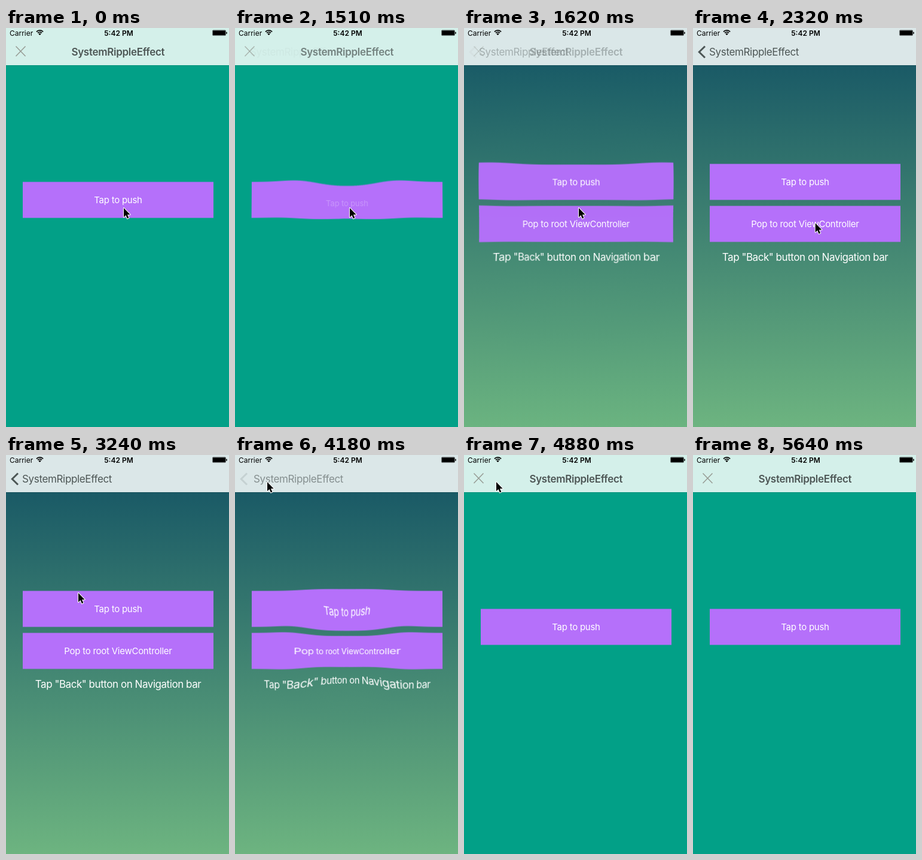
These frames come from a looping animation (373 by 665 pixels, 6.42 s). An HTML page with a canvas:

```html
<!DOCTYPE html>
<html lang="en">
<head>
<meta charset="utf-8">
<title>Ripple transition</title>
<style>
  html, body { margin: 0; width: 100%; height: 100%; overflow: hidden; background: #02a087; }
  canvas { display: block; width: 373px; height: 665px; }
</style>
</head>
<body>
<canvas id="stage" width="373" height="665"></canvas>
<script>
const W = 373, H = 665, BAR = 62, LOOP = 6420;
const PUSH = 1440, POP = 4120;
const PUSH_STEPS = [0, 70, 120, 180, 270, 330, 420, 480, 540, 610, 700, 760, 820, 880, 940, 1000];
const POP_STEPS = [0, 60, 150, 210, 300, 360, 450, 510, 610, 700, 760];

// Pointer moves: start, end, refreshes, from x, y, to x, y
const MOVES = [
  [0, 540, 1, 196, 299, 196, 299],
  [540, 650, 3, 196, 299, 191, 299],
  [2140, 2440, 6, 191, 299, 210, 337],
  [2610, 3240, 11, 210, 339, 120, 229],
  [3300, 3360, 2, 120, 229, 106, 175],
  [3540, 3710, 4, 106, 175, 53, 44],
  [5120, 5410, 6, 53, 44, 345, 640],
  [5590, 5640, 2, 345, 640, 345, 670]
];

const ctx = document.getElementById('stage').getContext('2d', { willReadFrequently: true });

const clamp = v => Math.max(0, Math.min(1, v));
const smooth = (a, b, v) => { const u = clamp((v - a) / (b - a)); return u * u * (3 - 2 * u); };
const fall = (length, power, t) => Math.pow(clamp(1 - t / length), power);
const snap = (steps, t) => steps.reduce((last, s) => s <= t ? s : last, 0);
const bell = v => Math.exp(-v * v);

function withAlpha(alpha, draw) {
  ctx.save();
  ctx.globalAlpha *= alpha;
  draw();
  ctx.restore();
}

function text(str, x, y, size, spacing, color, align = 'center', weight = 400) {
  ctx.font = `${weight} ${size}px Inter, Roboto, sans-serif`;
  ctx.letterSpacing = spacing + 'px';
  ctx.textAlign = align;
  ctx.fillStyle = color;
  ctx.fillText(str, x, y);
}

function line(points, width, color) {
  ctx.beginPath();
  points.forEach(([x, y], i) => i ? ctx.lineTo(x, y) : ctx.moveTo(x, y));
  ctx.lineWidth = width;
  ctx.strokeStyle = color;
  ctx.stroke();
}

function button(label, y, textAlpha = 1) {
  ctx.fillStyle = '#b570fa';
  ctx.fillRect(28, y, 319, 60);
  withAlpha(textAlpha, () => text(label, 187.5, y + 35.5, 15, -0.25, '#fff'));
}

function rootScreen(textAlpha) {
  ctx.fillStyle = '#02a087';
  ctx.fillRect(0, 0, W, H);
  button('Tap to push', 256.5, textAlpha);
}

function detailScreen() {
  const fill = ctx.createLinearGradient(0, BAR, 0, H);
  fill.addColorStop(0, 'rgb(26,90,102)');
  fill.addColorStop(1, 'rgb(109,180,128)');
  ctx.fillStyle = fill;
  ctx.fillRect(0, 0, W, H);
  button('Tap to push', 226.5);
  button('Pop to root ViewController', 296.5);
  text('Tap "Back" button on Navigation bar', 187.5, 388, 17, -0.45, '#fff');
}

// Radial wave: an outward crest followed by an inward trough.
function ripple(t) {
  const crest = 75 + 0.6 * t, width = 18 + 0.15 * t;
  const push = 4.2 * clamp((t + 15) / 85) * clamp((610 - t) / 300);
  const pull = 7.5 * clamp((t + 15) / 75) * Math.exp(-Math.max(0, t - 70) / 80);
  const shift = [];
  for (let r = 0; r < 420; r++) {
    const d = push * bell((r - crest) / width) - pull * bell((r - crest + 57) / 36);
    shift.push(d * Math.min(1, r / 20));
  }
  const image = ctx.getImageData(0, 0, W, H);
  const out = image.data, src = out.slice();
  const cx = W / 2, cy = H / 2;
  for (let y = BAR; y < H; y++) {
    for (let x = 0; x < W; x++) {
      const dx = x - cx, dy = y - cy;
      const r = Math.hypot(dx, dy) || 1;
      const d = shift[Math.round(r)];
      if (Math.abs(d) < 0.02) continue;
      const sx = Math.max(0, Math.min(W - 1.01, x - dx / r * d));
      const sy = Math.max(BAR, Math.min(H - 1.01, y - dy / r * d));
      const ix = sx | 0, iy = sy | 0, fx = sx - ix, fy = sy - iy;
      const i = (iy * W + ix) * 4, o = (y * W + x) * 4;
      for (let c = 0; c < 3; c++) {
        const a = src[i + c], b = src[i + c + 4];
        const e = src[i + c + W * 4], f = src[i + c + W * 4 + 4];
        out[o + c] = (a + (b - a) * fx) * (1 - fy) + (e + (f - e) * fx) * fy;
      }
    }
  }
  ctx.putImageData(image, 0, 0);
}

function statusBar() {
  text('Carrier', 6, 12.5, 12, 0, '#000', 'left');
  text('5:42 PM', 188.5, 12.5, 12, 0, '#000', 'center', 600);

  ctx.strokeStyle = ctx.fillStyle = '#000';
  ctx.lineWidth = 1.7;
  for (const r of [4.6, 7.6]) {
    ctx.beginPath();
    ctx.arc(56.5, 11.5, r, -Math.PI * 0.76, -Math.PI * 0.24);
    ctx.stroke();
  }
  ctx.beginPath();
  ctx.moveTo(56.5, 12);
  ctx.arc(56.5, 12, 3, -Math.PI * 0.76, -Math.PI * 0.24);
  ctx.fill();

  ctx.lineWidth = 0.5;
  ctx.beginPath();
  ctx.roundRect(345.4, 3.6, 22.2, 9, 1.5);
  ctx.stroke();
  ctx.fillRect(346, 4.3, 21, 7.6);
  ctx.beginPath();
  ctx.roundRect(368.2, 6.4, 1.5, 3.6, 0.8);
  ctx.fill();
}

function navigationBar(mix, nav) {
  ctx.fillStyle = '#d4f0ea';
  ctx.fillRect(0, 0, W, BAR);
  withAlpha(mix, () => {
    ctx.fillStyle = '#dbe7e8';
    ctx.fillRect(0, 0, W, BAR);
  });
  ctx.fillStyle = 'rgba(0,0,0,.16)';
  ctx.fillRect(0, BAR, W, 0.6);

  const ink = '#4d5655', name = 'SystemRippleEffect';
  withAlpha(nav.close, () => {
    line([[16.5, 30.5], [32.5, 47]], 1.5, '#979b94');
    line([[32.5, 30.5], [16.5, 47]], 1.5, '#979b94');
  });
  withAlpha(nav.title, () => text(name, 187.3, 46, 17, -0.3, ink, 'center', 600));
  withAlpha(nav.chevron, () => line([[20, 30.5], [10.3, 40], [20, 49.5]], 3, ink));
  withAlpha(nav.back, () => text(name, nav.backX, 46, 17, -0.35, ink, 'left'));
}

function pointer(t) {
  if (t >= 5640) return;
  const [start, end, steps, x0, y0, x1, y1] = MOVES.filter(m => t >= m[0]).pop();
  const p = clamp((Math.floor((t - start) / (end - start) * (steps - 1) + 1e-6) + 1) / steps);
  ctx.save();
  ctx.translate(x0 + (x1 - x0) * p + 1, y0 + (y1 - y0) * p + 1);
  ctx.beginPath();
  [[0, 0], [0, 15.2], [3.5, 12], [5.9, 17.6], [8.4, 16.5], [6, 11.1], [10.7, 10.9]]
    .forEach(([x, y]) => ctx.lineTo(x, y));
  ctx.closePath();
  ctx.lineJoin = 'round';
  ctx.lineWidth = 2;
  ctx.strokeStyle = '#fff';
  ctx.stroke();
  ctx.fillStyle = '#000';
  ctx.fill();
  ctx.restore();
}

function pushState(t) {
  return {
    mix: smooth(70, 190, t),
    nav: {
      close: fall(450, 2.2, t),
      title: fall(500, 2.2, t),
      chevron: smooth(100, 800, t),
      back: smooth(20, 400, t),
      backX: 25 + 2 * smooth(200, 600, t)
    }
  };
}

function popState(t) {
  return {
    mix: 1 - smooth(60, 220, t),
    nav: {
      close: smooth(250, 760, t),
      title: smooth(150, 700, t),
      chevron: 0.17 * fall(500, 1, t),
      back: 0.75 * fall(550, 1.8, t),
      backX: 27 + 4 * clamp(t / 60)
    }
  };
}

function render(t) {
  const pushing = t >= PUSH && t < POP;
  const since = t < PUSH ? LOOP : pushing ? t - PUSH : t - POP;
  const step = snap(pushing ? PUSH_STEPS : POP_STEPS, since);
  const { mix, nav } = pushing ? pushState(step) : popState(step);

  if (mix < 1) rootScreen(pushing ? 0.25 : 1);
  if (mix > 0) withAlpha(mix, detailScreen);
  if (step < 610) ripple(step);
  navigationBar(mix, nav);
  statusBar();
  pointer(t);
}

const begin = performance.now();
function tick() {
  render((performance.now() - begin) % LOOP);
  requestAnimationFrame(tick);
}
tick();
</script>
</body>
</html>
```
